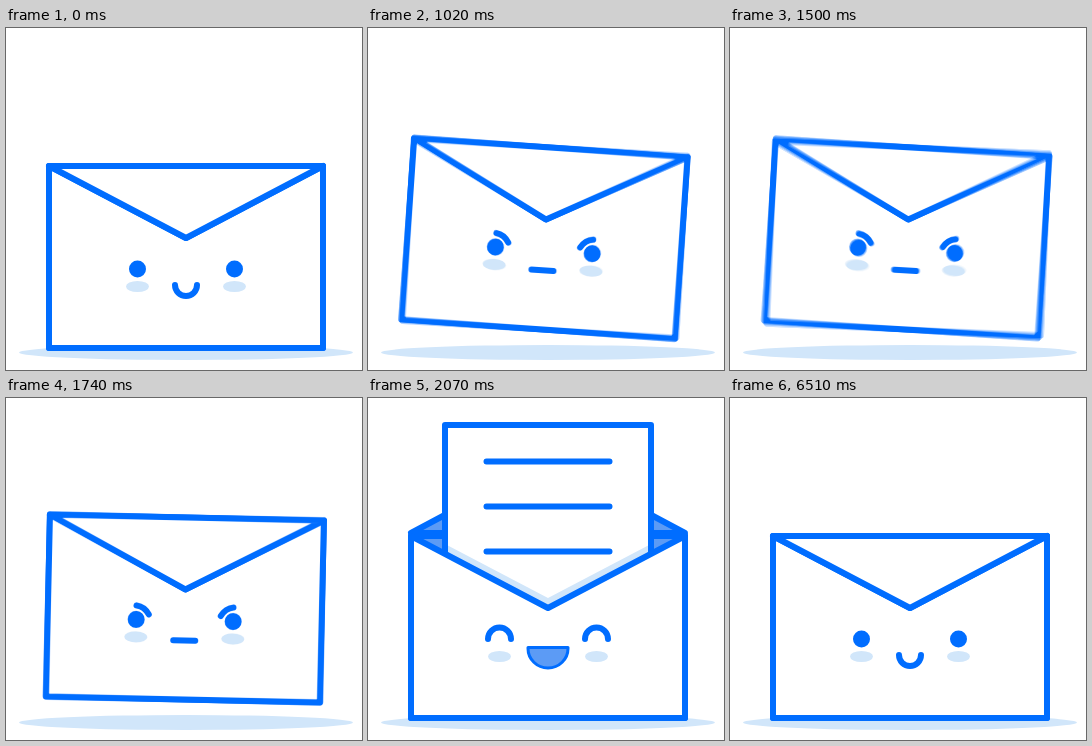
Recreate the animation shown at these times as an HTML page without scripts. Size 356 by 342 pixels, loop 7170 ms.

```html
<!DOCTYPE html>
<html lang="en">
<head>
<meta charset="utf-8">
<title>Envelope</title>
<style>
  @property --tilt  { syntax: "<angle>";  inherits: true; initial-value: 0deg; }
  @property --lift  { syntax: "<length>"; inherits: true; initial-value: 0px; }
  @property --flap  { syntax: "<number>"; inherits: true; initial-value: 1; }
  @property --sheet { syntax: "<length>"; inherits: true; initial-value: 130px; }
  @property --face  { syntax: "<number>"; inherits: true; initial-value: 0; }

  html, body { margin: 0; width: 100%; height: 100%; overflow: hidden; background: #fff; }
  svg { display: block; width: 100vw; height: 100vh; }

  /* Motion blur: averaged copies of the scene, each a few ms ahead of the last */
  .layer {
    opacity: calc(1 / (var(--i) + 1));
    animation: tilt 7170ms ease-in-out infinite, lift 7170ms ease-out infinite,
      flap 7170ms ease-in-out infinite, sheet 7170ms ease-in-out infinite,
      face 7170ms step-end infinite;
    animation-delay: calc(var(--i) * -4ms);
  }

  .line { stroke: #006dff; stroke-width: 6; stroke-linecap: round; stroke-linejoin: round; fill: none; }
  .paper { fill: #fff; }
  .inside { fill: #5c9bf5; }
  .pale { fill: #d1e6fa; }
  .dot { fill: #006dff; }
  .thin { stroke-width: 3; }

  .body { transform-origin: 180px 180px; transform: translateY(var(--lift)) rotate(var(--tilt)); }
  .sheet { transform: translateY(var(--sheet)); }
  .flap { vector-effect: non-scaling-stroke; }
  .front { transform-origin: 0 138px; transform: scale(1, max(0, var(--flap))); }
  .back { transform-origin: 0 135px; transform: scale(1, min(0, var(--flap))); }
  .mood { opacity: calc(1 - max(var(--face) - var(--k), var(--k) - var(--face))); }
  .calm { --k: 0; }
  .angry { --k: 1; }
  .happy { --k: 2; }

  @keyframes tilt {
    0%, 7.53% { --tilt: 0deg; }
    8.79%, 11.07%, 13.34%, 15.61%, 17.89%, 20.16%, 22.43% { --tilt: -4.2deg; }
    9.93%, 12.2%, 14.48%, 16.75%, 19.02%, 21.3% { --tilt: 4.2deg; }
    24.13% { --tilt: 1.5deg; }
    25.1%, 100% { --tilt: 0deg; }
  }
  @keyframes lift {
    0%, 7.4% { --lift: 0px; }
    9.2% { --lift: -18.5px; }
    26.4% { --lift: -18.5px; animation-timing-function: ease-in; }
    27.75%, 100% { --lift: 0px; }
  }
  @keyframes flap {
    0%, 25.1% { --flap: 1; }
    27.6%, 88.3% { --flap: -1; }
    90.6%, 100% { --flap: 1; }
  }
  @keyframes sheet {
    0%, 26.43% { --sheet: 130px; }
    28.03% { --sheet: -12px; }
    28.8% { --sheet: 0px; }
    86.92% { --sheet: 0px; animation-timing-function: cubic-bezier(.4, 0, .8, .8); }
    88.5%, 100% { --sheet: 130px; }
  }
  @keyframes face {
    0% { --face: 0; }
    8% { --face: 1; }
    26.9% { --face: 2; }
    89%, 100% { --face: 0; }
  }
</style>
</head>
<body>
<svg viewBox="0 0 356 342">
  <defs>
    <clipPath id="room"><rect y="-60" width="356" height="378"/></clipPath>

    <g id="eyes" class="dot">
      <circle cx="131.5" cy="241" r="8.5"/>
      <circle cx="228.5" cy="241" r="8.5"/>
    </g>

    <g id="scene">
      <rect class="paper" width="356" height="342"/>
      <ellipse class="pale" cx="180" cy="324.5" rx="167" ry="7.5"/>

      <g class="body">
        <path class="line inside flap back" d="M43 135H317L180 208Z"/>
        <path class="line inside" d="M43 138H317V320H43Z"/>

        <g clip-path="url(#room)">
          <g class="sheet">
            <path class="paper" d="M77 27H283V300H77Z"/>
            <path class="pale" d="M77 146L180 200L283 146V300H77Z"/>
            <path class="line" d="M77 300V27H283V300M118.500 63.500H241.500M118.500 108.500H241.500M118.500 153.500H241.500"/>
          </g>
        </g>

        <path class="line paper" d="M43 138L180 210L317 138V320H43Z"/>
        <path class="line paper flap front" d="M43 138H317L180 210Z"/>

        <g class="pale">
          <ellipse cx="131.5" cy="258.500" rx="11.500" ry="5.500"/>
          <ellipse cx="228.5" cy="258.500" rx="11.500" ry="5.500"/>
        </g>
        <g class="mood calm">
          <use href="#eyes"/>
          <path class="line" d="M169 257a11 11 0 0 0 22 0"/>
        </g>
        <g class="mood angry">
          <use href="#eyes"/>
          <path class="line" d="M131.500 227q8 1 12.500 8.700M228.500 227q-8 1 -12.500 8.700M169 261h22"/>
        </g>
        <g class="mood happy">
          <path class="line" d="M120 241a11.500 11.500 0 0 1 23 0M217 241a11.500 11.500 0 0 1 23 0"/>
          <path class="line thin inside" d="M160 249.500h40v1a20 19.500 0 0 1 -40 0z"/>
        </g>
      </g>
    </g>
  </defs>

  <use class="layer" href="#scene" style="--i:0"/>
  <use class="layer" href="#scene" style="--i:1"/>
  <use class="layer" href="#scene" style="--i:2"/>
  <use class="layer" href="#scene" style="--i:3"/>
  <use class="layer" href="#scene" style="--i:4"/>
</svg>
</body>
</html>
```
